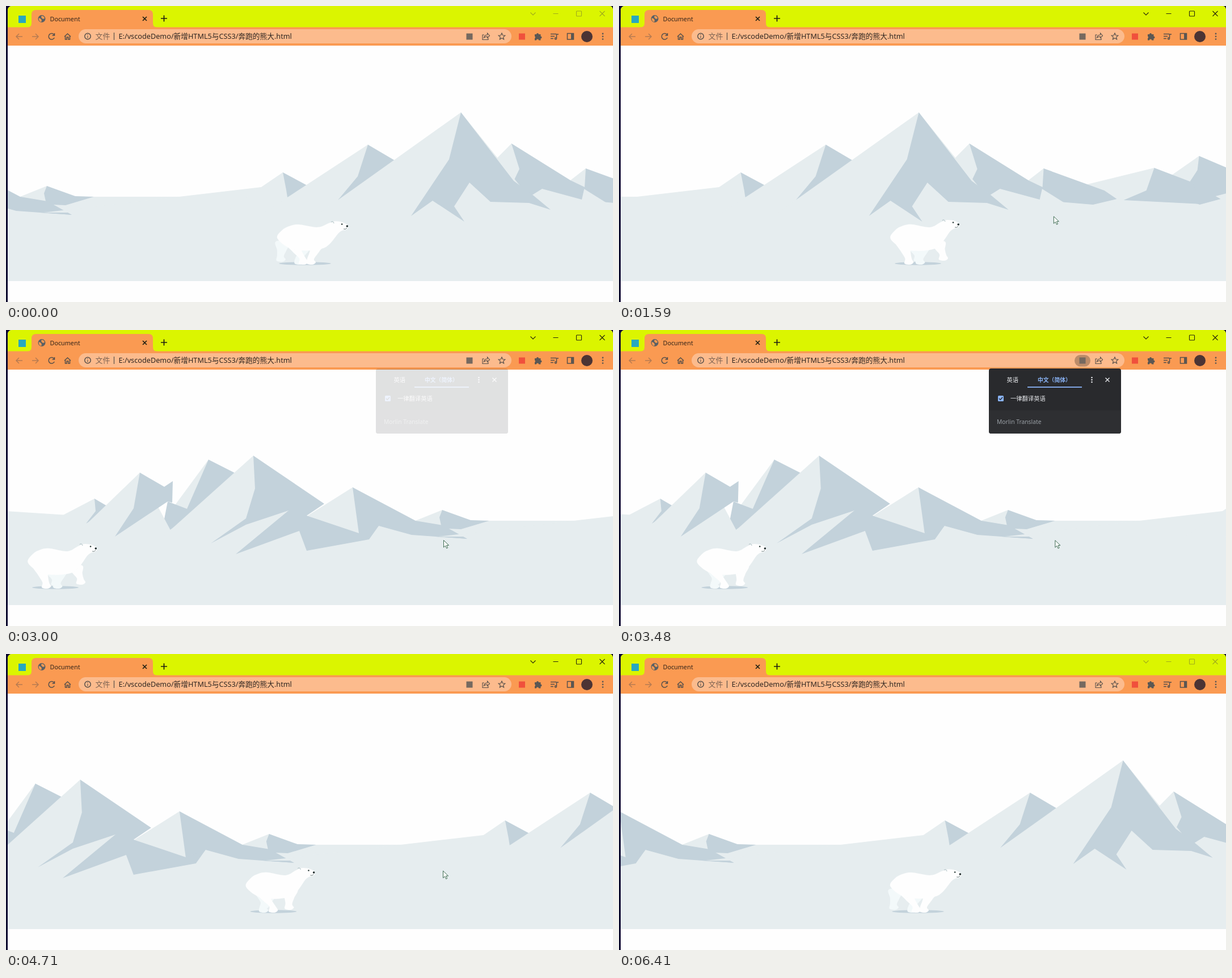
An HTML page for the animation above (6500 ms loop, 1070 by 523 pixels).

```html
<!DOCTYPE html>
<html lang="zh">
<head>
<meta charset="utf-8">
<title>Document</title>
<style>
html, body { margin: 0; width: 100%; height: 100%; overflow: hidden; background: #fefefe; }
svg { display: block; width: 1070px; height: 523px; }
text { font-family: "Noto Sans", "Noto Sans CJK SC", "Noto Sans CJK", sans-serif; }
.line { fill: none; stroke: #57504b; stroke-width: 1.5; }
.light { fill: #e6edef; }
.dark { fill: #c3d2db; }
.near { fill: #fefefe; }
.far { fill: #f3f9fa; }
</style>
</head>
<body>
<svg viewBox="0 0 1070 523">
  <rect width="1070" height="523" fill="#fefefe"/>
  <rect class="light" y="337" width="1070" height="149"/>
  <g id="land"><g id="west" transform="translate(-697 0)"></g><g id="east"></g></g>

  <g id="bear">
    <ellipse id="shadow" class="dark" cx="527" cy="455" ry="2.7"/>
    <path id="hindFar" class="far"/>
    <path id="foreFar" class="far"/>
    <path id="hind" class="near"/>
    <path id="fore" class="near"/>
    <path id="body" class="near"/>
    <g id="face">
      <path d="M-30,-7 q3,-3 5,2" fill="none" stroke="#b9c8cc" stroke-width="1.3"/>
      <circle cx="-11" cy="-3.500" r="1.3" fill="#2c3d3a"/>
      <circle cx="-1.800" r="1.8" fill="#1d2a2a"/>
      <path d="M-8,5 q4,1.5 6,-2" fill="none" stroke="#6d7f80"/>
    </g>
  </g>

  <!-- browser window -->
  <rect width="3" height="523" fill="#0d0630"/>
  <path d="M0,0 H1070 V9 Q1070,0 1063,0 H11 Q3,0 3,9 V20 H0z" fill="#0d0630"/>
  <path d="M3,38 V8 Q3,0 11,0 H1064 Q1069,0 1070,6 V38z" fill="#dbf500"/>
  <rect x="3" y="37.5" width="1067" height="32.500" fill="#fa9a52"/>
  <path d="M37,38 q8,0 8,-8 V15 q0,-8 8,-8 H251 q8,0 8,8 V30 q0,8 8,8z" fill="#fa9a52"/>
  <rect x="22" y="17" width="13" height="13" fill="#27a8c0"/>
  <circle cx="63" cy="22.5" r="6.5" fill="#5a6064"/>
  <path d="M58,21 l4,2 1,4 -2,1 q-4,-2 -3,-7z M63,17 l4,2 1,3 -3,1 -3,-3z" fill="#fa9a52"/>
  <text x="77.5" y="27" font-size="10.8" fill="#33241a">Document</text>
  <path d="M241,19 l7,7 m0,-7 l-7,7 M273,22 h11 m-5.5,-5.5 v11" fill="none" stroke="#1e1e12" stroke-width="1.7"/>

  <g id="controls" fill="none" stroke-width="1.1">
    <path d="M924.5,11.5 l4.5,4.5 4.5,-4.5 M964.5,13.5 h9 M1046.5,9 l9,9 m0,-9 l-9,9"/>
    <rect x="1005.5" y="9" width="9" height="9" rx="1"/>
  </g>

  <g class="line">
    <path d="M29,54 h-11 m5,-5 l-5,5 5,5 M46,54 h11 m-5,-5 l5,5 -5,5" stroke="#b77b51"/>
    <path d="M85,51 a5.3,5.3 0 1 0 .3,5 M85.5,48 v4 h-4"/>
    <path d="M103,54 l5.5,-5 5.5,5 M104.5,53 v6 h2.7 v-4 h2.6 v4 h2.7 v-6"/>
  </g>
  <rect x="128" y="41" width="763" height="25" rx="12.5" fill="#fcbb8d"/>
  <rect id="hot" x="803" y="44" width="28" height="20.5" rx="10" fill-opacity=".25"/>
  <g class="line">
    <circle cx="144" cy="53.5" r="5.2"/>
    <path d="M144,53 v3.5 M144,50 v1.5 M190.5,47 v13" stroke-width="1.2"/>
    <path d="M843,51 h-3 v8.500 h10 v-3 M842.5,56 q1,-5 6,-5 v-3 l4,4.500 -4,4 v-2.500 q-4,0 -6,2z" stroke-width="1.1"/>
    <path d="M874,48 l1.7,3.8 4.1,.4 -3.1,2.7 .9,4.1 -3.6,-2.2 -3.6,2.2 .9,-4.1 -3.1,-2.7 4.1,-.4z" stroke-width="1.2"/>
    <path d="M960,49.5 h10 M960,53.5 h7 M960,57.5 h5 M970.5,57 v-7 h3.5"/>
    <circle cx="969" cy="57.5" r="1.5"/>
    <rect x="989.5" y="48.5" width="11" height="10.5"/>
  </g>
  <g fill="#5b5753">
    <rect x="811.5" y="48.5" width="11" height="11" fill="#75695f"/>
    <rect x="996" y="48.5" width="4.5" height="10.5"/>
    <path d="M932,50 h3 a2,2 0 1 1 4,0 h3.5 v3.500 a2,2 0 1 1 0,4 v3 h-3.500 a2,2 0 0 0 -4,0 h-3 v-3.500 a2,2 0 0 0 0,-3.500z"/>
    <path d="M1052,49 v0 m0,4.800 v0 m0,4.800 v0" stroke="#5b5753" stroke-width="2.8" stroke-linecap="round"/>
  </g>
  <rect x="904" y="48.5" width="11" height="11" fill="#f0503c"/>
  <circle cx="1024" cy="54" r="10" fill="#4c3434"/>
  <text x="157.5" y="58" font-size="13" fill="#7b6252">文件</text>
  <text x="198.5" y="58" font-size="12.7" fill="#2e2621">E:/vscodeDemo/新增HTML5与CSS3/奔跑的熊大.html</text>

  <g id="popup">
    <rect x="652" y="68" width="233" height="115" rx="4" fill="#292a2d"/>
    <path d="M652,142 h233 v37 q0,4 -4,4 h-225 q-4,0 -4,-4z" fill="#2e2f32"/>
    <g font-size="10.3" fill="#e8eaed">
      <text x="683.5" y="92">英语</text>
      <text x="738" y="92" font-weight="bold" fill="#8ab4f8" font-size="9.8">中文（简体）</text>
      <text x="690" y="125">一律翻译英语</text>
      <text x="666" y="166" fill="#9aa0a6">Morlin Translate</text>
    </g>
    <rect x="720" y="100" width="96" height="1.8" fill="#8ab4f8"/>
    <rect x="668" y="116" width="10" height="10" rx="1.5" fill="#8ab4f8"/>
    <path d="M670,121 l2.2,2.3 4,-4.5" fill="none" stroke="#292a2d" stroke-width="1.4"/>
    <path d="M857.5,84.5 l7,7 m0,-7 l-7,7" stroke="#e8eaed" stroke-width="1.4"/>
    <path d="M833.5,84 v0 m0,4 v0 m0,4 v0" stroke="#e8eaed" stroke-width="2.6" stroke-linecap="round"/>
  </g>

  <circle id="ring" fill="none" stroke="#7fb3ee" stroke-width="3"/>
  <path id="cursor" d="M.5,.5 v12.500 l3,-2.800 2.200,4.600 2,-1 -2.100,-4.400 h4z" fill="#fff" stroke="#3c6a50"/>
</svg>

<script>
const $ = id => document.getElementById(id);
const LOOP = 6500, FRAME = 77.5, RELOAD = 2950;
const SCROLL = .179, STRIDE = 413 / 8;
const TRAVEL = 443.5, WALK = 3000;

// A hill is a lit triangle down to FOOT, with a shaded face that starts at the peak
const FOOT = 365;
function range(id, hills) {
  $(id).innerHTML = hills.map(([x, y, left, right, shade]) =>
    `<polygon class="light" points="${x},${y} ${x - left},${FOOT} ${x + right},${FOOT}"/>` +
    (shade ? `<polygon class="dark" points="${x},${y} ${shade}"/>` : '')).join('');
}
range('west', [
  [0, 320, 200, 700],
  [769, 318, 117, 120, '819,336 852,337 802,352 779,351 813,369 715,362 767,345 764,331'],
  [611, 278, 138, 150, '722,337 770,345 813,369 715,362 657,346 640,366 622,359'],
  [357, 229, 100, 80, '418,260 273,365 285,303 319,316'],
  [156, 298, 128, 60, '185,315 141,342 158,320'],
  [236, 252, 117, 60, '279,277 294,267 293,305 285,303 192,365 225,315'],
  [436, 222, 159, 90, '561,307 530,328 622,359 657,346 640,370 530,390 517,355 405,396 498,319 423,344 361,377 423,333 439,280']
]);
range('east', [
  [450, 320, 384, 600],
  [1296, 265, 143, 234, '1439,326 1540,335 1390,342 1363,326 1325,336 1334,341 1297,351 1270,340 1280,310 1293,290'],
  [1217, 286, 320, 80, '1285,312 1300,350 1163,343 1203,326'],
  [1022, 287, 100, 150, '1129,326 1151,341 1109,351 1005,342 1000,325 1020,320'],
  [891, 243, 120, 195, '995,308 1020,320 1015,342 945,323 910,345 895,309 905,288'],
  [488, 294, 104, 70, '540,322 496,338 494,325'],
  [638, 245, 183, 90, '694,278 585,343 620,301'],
  [802, 188, 248, 142, '895,309 930,335 960,360 922,348 854,346 817,312 790,354 808,381 752,344 714,371 781,271']
]);

// Bear outline when gathered and when stretched; point 8 is the nose
const points = s => s.split(' ').map(p => p.split(',').map(Number));
const NOSE = 8;
const gathered = points('479,412 487,396 501,388 517,386 548,391 567,382 578,378 592,380 600,386 597,392 585,397 558,428 508,431');
const stretched = points('477,408 487,395 505,389 523,387 557,390 588,390 601,393 613,399 620,405 616,411 603,414 570,427 510,428');

// Feet swing along x and lift once per stride
const legs = {
  hind:    { home: 495, reach: 32, swing: -.29, lift: 3.93, pull: .2 },
  fore:    { home: 554, reach: 24, swing: 1.57, lift: .79, pull: .3 },
  hindFar: { home: 493, reach: 35, swing: 1.05, lift: 1.57, pull: .6 },
  foreFar: { home: 557, reach: 49, swing: 2.93, lift: 5.5, pull: .6 }
};

const mix = (a, b, k) => a + (b - a) * k;
const clamp = v => Math.min(1, Math.max(0, v));
const ramp = (t, start, length) => clamp((t - start) / length);

// CSS "ease": cubic-bezier(.25, .1, .25, 1)
function ease(x) {
  let lo = 0, hi = 1, s = .5;
  const curve = (p, q) => 3 * p * (1 - s) ** 2 * s + 3 * q * (1 - s) * s * s + s ** 3;
  for (let i = 0; i < 24; i++) {
    if (curve(.25, .25) < x) lo = s; else hi = s;
    s = (lo + hi) / 2;
  }
  return curve(.1, 1);
}

// Closed smooth curve through the points
function smooth(p) {
  const n = p.length, at = i => p[(i + n) % n];
  return 'M' + p[0] + p.map((b, i) => {
    const a = at(i - 1), c = at(i + 1), e = at(i + 2);
    const c1 = b.map((v, k) => v + (c[k] - a[k]) / 6);
    const c2 = c.map((v, k) => v - (e[k] - b[k]) / 6);
    return `C${c1} ${c2} ${c}`;
  }).join('') + 'z';
}

const place = (el, x, y) => el.setAttribute('transform', `translate(${x} ${y})`);
const show = (el, on) => el.setAttribute('visibility', on ? 'visible' : 'hidden');

function legShape({ home, reach, swing, lift, pull }, turn) {
  const x = home + reach * Math.sin(turn + swing);
  const y = 451 - 7 * Math.max(0, Math.cos(turn - lift));
  const hip = mix(home + 3, x, pull), top = 416;
  const kneeX = (hip + x) / 2, kneeY = (top + y) / 2;
  return smooth([[hip - 13, top], [hip + 13, top], [kneeX + 8.5, kneeY], [x + 6, y - 4], [x + 9, y + 2],
    [x + 3, y + 6], [x - 7, y + 4], [x - 6, y - 5], [kneeX - 8.5, kneeY]]);
}

function drawBear(t) {
  const loaded = t >= RELOAD;
  place($('bear'), loaded ? TRAVEL * (ease(ramp(t, RELOAD, WALK)) - 1) : 0, 0);

  const step = Math.floor(loaded ? (t - RELOAD) / STRIDE + .2 : t / STRIDE + 3.92) % 8;
  const turn = step * Math.PI / 4;
  const stretch = clamp(.5 - .65 * Math.cos(turn - 1.34));
  const body = gathered.map((p, i) => p.map((v, j) => mix(v, stretched[i][j], stretch)));
  $('body').setAttribute('d', smooth(body));
  place($('face'), ...body[NOSE]);
  for (const id in legs) $(id).setAttribute('d', legShape(legs[id], turn));
  $('shadow').setAttribute('rx', 41 + 31 * stretch);
}

// Mouse: start, duration and goal of each move; clicks leave a growing ring
const moves = [[300, 300, 643, 379], [1000, 600, 771, 371], [3400, 350, 742, 373], [4300, 1000, 820, 400], [5650, 500, 845, 523]];
const clicks = [3830, 5450];

function drawMouse(t) {
  let x = 625, y = 478;
  for (const [start, length, goalX, goalY] of moves) {
    const k = ramp(t, start, length), s = k * k * (3 - 2 * k);
    x = mix(x, goalX, s);
    y = mix(y, goalY, s);
  }
  show($('cursor'), t >= 300 && t < 6150);
  place($('cursor'), x, y);

  const click = clicks.find(c => t >= c && t < c + 240);
  show($('ring'), click);
  if (!click) return;
  place($('ring'), x, y);
  $('ring').setAttribute('r', 2 + (t - click) * .1);
  $('ring').setAttribute('opacity', 1 - (t - click) / 500);
}

function draw(t) {
  place($('land'), -SCROLL * t + (t >= RELOAD ? 1234 : 0), 0);
  drawBear(t);
  drawMouse(t);
  $('controls').setAttribute('stroke', t >= 600 && t < 6330 ? '#26270c' : '#a0ab1c');
  $('popup').setAttribute('opacity', Math.min(ramp(t, 2980, 150), 1 - ramp(t, 3850, 95)));
  show($('hot'), t >= 3050 && t < 4300);
}

const start = performance.now();
function tick() {
  const t = (performance.now() - start) % LOOP;
  const n = Math.floor((t - 45) / FRAME);
  draw(n < 0 ? 0 : 55 + n * FRAME);
  requestAnimationFrame(tick);
}
tick();
</script>
</body>
</html>
```
